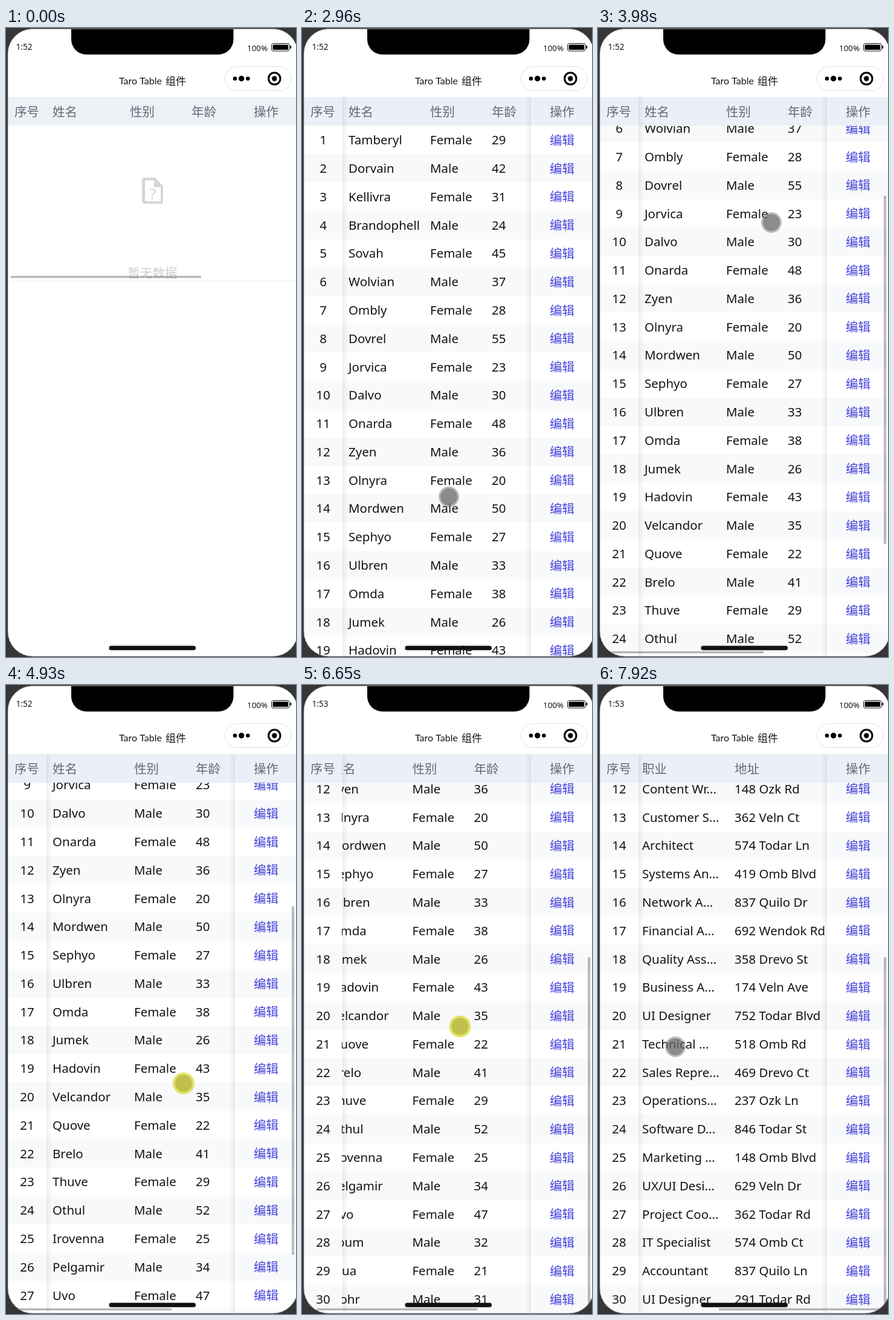
An HTML page with a canvas that plays this animation: 480x1038 px, repeating every 7990 ms.

```html
<!DOCTYPE html>
<html lang="zh">
<head>
<meta charset="utf-8">
<title>Taro Table 组件</title>
<style>
html, body { margin: 0; width: 100%; height: 100%; overflow: hidden; background: #363636; }
canvas { display: block; }
</style>
</head>
<body>
<canvas id="stage" width="480" height="1038"></canvas>
<script>
const ctx = document.getElementById('stage').getContext('2d');
const LOOP = 7990, ROW = 46.78, TOP = 114, BODY = 161.3;
const LOADING = 220, READY = 2180;
const LEFT = 67, RIGHT = 379, MAX = { x: 343, y: 528 };
const CJK = '"Noto Sans CJK SC", "Noto Sans CJK", sans-serif';
const INK = '#141414', HEAD_INK = '#636a78', LINK = '#4643dc';

// Name, age, job, address; the last two only come into view from row 12 on.
const people = `Tamberyl,29
Dorvain,42
Kellivra,31
Brandophell,24
Sovah,45
Wolvian,37
Ombly,28
Dovrel,55
Jorvica,23
Dalvo,30
Onarda,48
Zyen,36,Content Wr...,148 Ozk Rd
Olnyra,20,Customer S...,362 Veln Ct
Mordwen,50,Architect,574 Todar Ln
Sephyo,27,Systems An...,419 Omb Blvd
Ulbren,33,Network A...,837 Quilo Dr
Omda,38,Financial A...,692 Wendok Rd
Jumek,26,Quality Ass...,358 Drevo St
Hadovin,43,Business A...,174 Veln Ave
Velcandor,35,UI Designer,752 Todar Blvd
Quove,22,Technical ...,518 Omb Rd
Brelo,41,Sales Repre...,469 Drevo Ct
Thuve,29,Operations...,237 Ozk Ln
Othul,52,Software D...,846 Todar St
Irovenna,25,Marketing ...,148 Omb Blvd
Pelgamir,34,UX/UI Desi...,629 Veln Dr
Uvo,47,Project Coo...,362 Todar Rd
Loum,32,IT Specialist,574 Omb Ct
Mua,21,Accountant,837 Quilo Ln
Gohr,31,UI Designer,291 Todar Rd`.split('\n').map((line, i) => {
  const [name, age, job = '', place = ''] = line.split(',');
  return [name, i % 2 ? 'Male' : 'Female', age, job, place];
});
const columns = [['姓名', 77], ['性别', 212], ['年龄', 314], ['职业', 416], ['地址', 569]];

// Finger stops; an axis marks the move to the next stop as a drag that scrolls.
const stops = [
  { t: 2650, x: 212, y: 1070 },
  { t: 3200, x: 264, y: 574, drag: 'y' },
  { t: 3780, x: 287, y: 321 },
  { t: 4000, x: 287, y: 321 },
  { t: 4560, x: 303, y: 798.5, drag: 'y' },
  { t: 5300, x: 285, y: 517.5 },
  { t: 6180, x: 291, y: 562 },
  { t: 6575, x: 291, y: 562, drag: 'x' },
  { t: 6950, x: 14, y: 576 },
  { t: 7360, x: 264, y: 637 },
  { t: 7520, x: 264, y: 637, drag: 'x' },
  { t: 7880, x: 128, y: 597 },
  { t: LOOP, x: 128, y: 597 }
];

// Finger position, scroll offsets and time since the last scroll activity.
function gesture(t) {
  const g = { x: 0, y: 0, down: false, scroll: { x: 0, y: 0 }, idle: t - READY };
  for (let i = 0; i < stops.length - 1 && stops[i].t <= t; i++) {
    const a = stops[i], b = stops[i + 1];
    const p = Math.min(1, (t - a.t) / (b.t - a.t)), e = p * p * (3 - 2 * p);
    g.x = a.x + (b.x - a.x) * e;
    g.y = a.y + (b.y - a.y) * e;
    g.down = !!a.drag && p < 1;
    if (a.drag) {
      const k = a.drag;
      g.scroll[k] = Math.min(MAX[k], g.scroll[k] + a[k] - g[k]);
      g.idle = Math.max(0, t - b.t);
    }
  }
  return g;
}

function rect(x, y, w, h, color) {
  ctx.fillStyle = color;
  ctx.fillRect(x, y, w, h);
}
function pill(x, y, w, h, r, color, line) {
  ctx.beginPath();
  ctx.roundRect(x, y, w, h, r);
  if (line) { ctx.strokeStyle = color; ctx.lineWidth = line; ctx.stroke(); }
  else { ctx.fillStyle = color; ctx.fill(); }
}
function dot(x, y, r, color) {
  ctx.beginPath();
  ctx.arc(x, y, r, 0, 7);
  ctx.fillStyle = color;
  ctx.fill();
}
function text(s, x, baseline, { color = INK, size = 20.5, align = 'left', font = '"Noto Sans"' } = {}) {
  ctx.font = `${size}px ${font}, ${CJK}`;
  ctx.textAlign = align;
  ctx.fillStyle = color;
  ctx.fillText(s, x, Math.round(baseline));
}
function heading(s, x) {
  text(s, x, 146, { color: HEAD_INK });
}
function clipped(x, y, w, h, draw) {
  ctx.save();
  ctx.beginPath();
  ctx.rect(x, y, w, h);
  ctx.clip();
  draw();
  ctx.restore();
}
function shade(x0, x1) {
  const g = ctx.createLinearGradient(x0, 0, x1, 0);
  g.addColorStop(0, 'rgba(20,25,40,.065)');
  g.addColorStop(1, 'rgba(20,25,40,0)');
  rect(Math.min(x0, x1), TOP, Math.abs(x1 - x0), 924, g);
}

function drawEmpty(t) {
  rect(3, TOP, 480, 47, '#ecf1f5');
  heading('序号', 14);
  heading('操作', 410);
  columns.slice(0, 3).forEach(([title, x], i) => heading(title, i ? x - 7 : x));
  const grey = '#d6d6d6';
  ctx.fillStyle = grey;
  ctx.fill(new Path2D('M229 247h18l13 14v25q0 4-4 4h-27q-4 0-4-4v-35q0-4 4-4z' +
    'M230 251.5v34.5h26v-23.5h-11v-11z'), 'evenodd');
  text('?', 243, 283, { color: grey, size: 25, align: 'center' });
  text('暂无数据', 242.5, t < 70 ? 412 : 330, { color: '#cdced0', align: 'center' });
  rect(3, 417, 480, 1, '#f2f2f2');
  rect(8, 409, 315, 3.5, 'rgba(0,0,0,.27)');
}

function drawTable({ x: sx, y: sy }) {
  const eachRow = draw => people.forEach((person, i) => {
    const y = BODY + i * ROW - sy;
    if (y > TOP - ROW && y < 1038) draw(person, y + 31, i);
  });
  eachRow((_, base, i) => {
    if (i % 2) rect(3, base - 31, 480, ROW, '#f8f9fa');
    text(i + 1, 35, base, { align: 'center' });
    text('编辑', 430.5, base + .6, { color: LINK, align: 'center' });
  });
  rect(3, TOP, 480, 47.3, '#ebeff7');
  heading('序号', 14);
  heading('操作', 410);
  clipped(LEFT - 1, BODY, RIGHT - LEFT + 1, 924, () =>
    eachRow((person, base) => columns.forEach(([, x], c) => text(person[c], x - sx, base))));
  clipped(LEFT - 1, TOP, RIGHT - LEFT + 1, 48, () =>
    columns.forEach(([title, x]) => heading(title, x - sx)));
  shade(LEFT, LEFT + 10);
  shade(RIGHT, RIGHT - 10);
}

function drawLoading(t) {
  rect(3, TOP, 480, 924, 'rgba(255,255,255,.78)');
  const head = Math.floor((t - 2019) / 83.3) - 1;
  for (let k = 0; k < 7; k++) {
    const a = (head - k) * Math.PI / 6;
    dot(243 + 18 * Math.sin(a), 576 - 18 * Math.cos(a), 2.9, `rgba(85,92,125,${.62 - k * .085})`);
  }
}

function drawScrollbars({ scroll, idle }) {
  if (idle >= 320) return;
  const color = `rgba(0,0,0,${idle < 240 ? .27 : .13})`;
  rect(473, 118.5 + scroll.y * .626, 4, 575, color);
  rect(8 + scroll.x * .56, 1028.5, 266, 3.5, color);
}

function drawFinger({ x, y, down }) {
  dot(x, y, down ? 18 : 17, down ? 'rgba(220,222,75,.85)' : 'rgba(110,110,110,.45)');
  dot(x, y, 14, down ? 'rgba(185,183,72,.8)' : 'rgba(100,100,100,.55)');
}

function drawTopBar(t) {
  rect(0, 0, 480, TOP, '#fff');
  pill(108, -10, 268.5, 53.7, [0, 0, 25, 25], '#000');
  text(t < 5700 ? '1:52' : '1:53', 16.5, 36, { size: 13.6 });
  text('100%', 399, 38, { size: 13.4 });
  pill(439.5, 25.5, 29.5, 12.5, 3, '#111', 1);
  pill(441.5, 27.5, 25.5, 8.5, 1.5, '#000');
  pill(470, 29, 2.2, 5, 1, '#111');
  text('Taro Table', 187, 93, { size: 16, font: 'Lato' });
  text('组件', 264, 93.5, { size: 17 });
  pill(362.5, 63.5, 109.5, 40, 20, '#dfdfdf', 1);
  [3.3, 4.7, 3.3].forEach((r, i) => dot(379 + i * 10.7, 83.5, r, '#000'));
  dot(444.3, 83.5, 11.2, '#000');
  dot(444.3, 83.5, 8.2, '#fff');
  dot(444.3, 83.5, 4.2, '#000');
}

function draw(t) {
  const finger = gesture(t);
  rect(0, 0, 480, 1038, '#363636');
  ctx.save();
  ctx.beginPath();
  ctx.roundRect(3, 1.5, 480, 1035.5, 41);
  ctx.clip();
  rect(0, 0, 480, 1038, '#fff');
  if (t < LOADING) drawEmpty(t);
  else {
    drawTable(finger.scroll);
    if (t < READY) drawLoading(t);
    else drawScrollbars(finger);
  }
  drawTopBar(t);
  pill(170.5, 1019.6, 143.5, 7.2, 3.6, '#111');
  ctx.restore();
  pill(3, 1.5, 480, 1035.5, 41, '#858585', .8);
  if (t >= stops[0].t) drawFinger(finger);
}

const start = performance.now();
function tick() {
  draw((performance.now() - start) % LOOP);
  requestAnimationFrame(tick);
}
tick();
</script>
</body>
</html>
```
